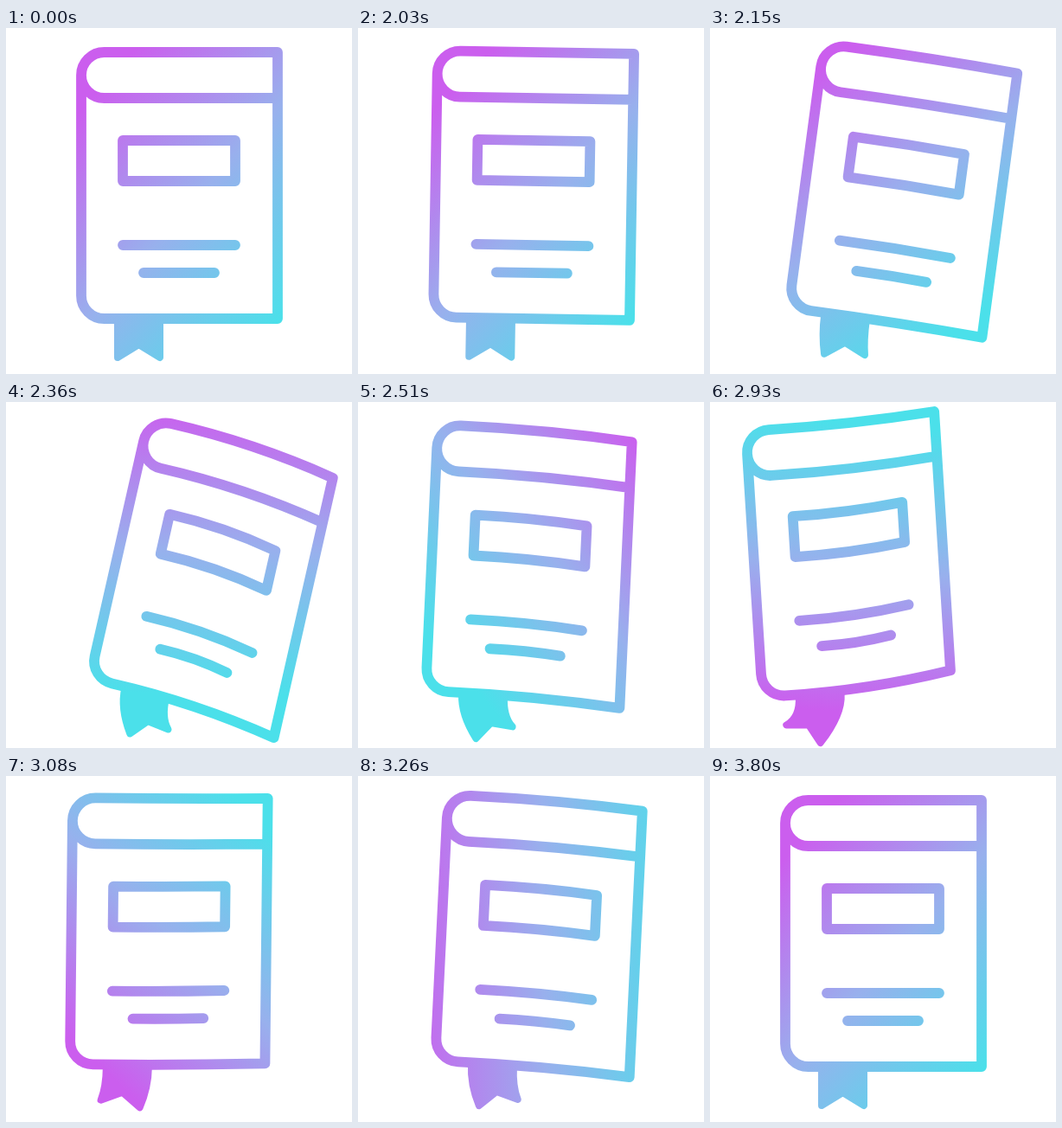
An HTML page with a canvas that plays this animation: 400x400 px, repeating every 3.83 s.

```html
<!DOCTYPE html>
<html>
<head>
<meta charset="utf-8">
<title>Swaying book</title>
<style>
html, body { margin: 0; width: 100%; height: 100%; overflow: hidden; background: #fff; }
canvas { display: block; width: 400px; height: 400px; }
</style>
</head>
<body>
<canvas id="stage" width="400" height="400"></canvas>
<script>
const ctx = document.getElementById('stage').getContext('2d');
const LOOP = 3830, START = 2030, STEP = 30, GRADIENT_HALF = 167;
const PIVOT = [200, 336];

// time, tilt (deg), shift x, shift y, cover bend, ribbon sway, gradient angle (deg), gradient centre x, y
const KEYS = [
  [2000, 0, 0, 0, 0, 0, 42, 200, 219],
  [2030, 0.95, 0, 0, 0, 0, 43, 200, 219],
  [2300, 13.6, 7, 7.5, 15, 13, 77, 200, 174],
  [2360, 12.8, 7, 8.6, 19.7, 14, 91, 200, 170],
  [2540, 0.5, -12, 2, 7, 15, 150, 242, 196],
  [2690, -8.6, -21.8, -1.7, -7.8, 14, 207, 280, 226],
  [2750, -9.2, -25, -1.9, -9, 8, 226, 262, 220],
  [2930, -3.6, -26.5, -2, -12.7, -22, 275, 200, 195],
  [3230, 2.9, 1.7, -1.3, 8, 8.5, 351, 213, 199],
  [3260, 2.8, 2, -1.3, 8, 9, 359, 215, 200],
  [3680, 0, 0, 0, 0, 0, 402, 200, 219]
];

const rad = deg => deg * Math.PI / 180;
const secant = (i, c) => (KEYS[i + 1][c] - KEYS[i][c]) / (KEYS[i + 1][0] - KEYS[i][0]);

// Monotone tangent: flat at extremes, harmonic mean elsewhere
function tangent(i, c) {
  if (i === 0 || i === KEYS.length - 1) return 0;
  const a = secant(i - 1, c), b = secant(i, c);
  return a * b <= 0 ? 0 : 2 * a * b / (a + b);
}

function poseAt(t) {
  const last = KEYS.length - 1;
  if (t < START) return KEYS[0].slice(1);
  if (t >= KEYS[last][0]) return KEYS[last].slice(1);
  const i = KEYS.findIndex(k => k[0] > t) - 1;
  const a = KEYS[i], b = KEYS[i + 1], span = b[0] - a[0], u = (t - a[0]) / span;
  const ease = u * u * (3 - 2 * u);
  return a.slice(1).map((v, j) => {
    const c = j + 1;
    return v + (b[c] - v) * ease
      + span * u * (1 - u) * ((1 - u) * tangent(i, c) - u * tangent(i + 1, c));
  });
}

// Moves a point of the cover; the spine side stays stiff
function warp(x, y, bend) {
  const u = Math.max(0, (x - 113) / 201);
  const w = u * u * (2.2 - 1.2 * u);
  const lift = bend < 0 ? 0.65 + 0.7 * y / 336 : 1;
  const shrink = bend < 0 ? -0.65 * bend : 0.22 * bend;
  return [x - shrink * u ** 4, y + bend * w * lift];
}

// Curved horizontal edge, flat at its left end
function edgeTo(x1, x2, y, bend) {
  const a = warp(x1, y, bend), b = warp(x2, y, bend);
  const left = x1 < x2 ? a : b;
  ctx.quadraticCurveTo((a[0] + b[0]) / 2, left[1], ...b);
}

function bar(x1, x2, y, bend) {
  ctx.moveTo(...warp(x1, y, bend));
  edgeTo(x1, x2, y, bend);
}

function coverPath(bend) {
  const r = 26.5, cx = 87 + r;
  ctx.beginPath();
  ctx.moveTo(314, 81);
  ctx.moveTo(...warp(314, 81, bend));
  edgeTo(314, cx, 81, bend);
  ctx.arc(cx, 54.5, r, Math.PI / 2, Math.PI * 1.5);
  edgeTo(cx, 314, 28, bend);
  ctx.lineTo(...warp(314, 336, bend));
  edgeTo(314, cx, 336, bend);
  ctx.arc(cx, 336 - r, r, Math.PI / 2, Math.PI);
  ctx.lineTo(87, 54.5);

  bar(135, 265, 130, bend);
  ctx.lineTo(...warp(265, 177, bend));
  edgeTo(265, 135, 177, bend);
  ctx.closePath();
  bar(135, 265, 251, bend);
  bar(159, 241, 283, bend);
}

function ribbonPath(sway) {
  const s = Math.abs(sway);
  const left = [129 + sway + s / 4, 381 + sway * 0.5];
  const right = [178 + sway - s / 4, 381 - sway * 0.55];
  ctx.beginPath();
  ctx.moveTo(129, 338);
  ctx.quadraticCurveTo(129, 362, ...left);
  ctx.lineTo(153.5 + sway * 0.7, 366 + s * 0.25);
  ctx.lineTo(...right);
  ctx.quadraticCurveTo(178, 362, 178, 338);
  ctx.closePath();
}

function place(tilt, x, y) {
  ctx.translate(PIVOT[0] + x, PIVOT[1] + y);
  ctx.rotate(rad(tilt));
  ctx.translate(-PIVOT[0], -PIVOT[1]);
}

function draw(t) {
  const [tilt, x, y, bend, sway, angle, gx, gy] = poseAt(t);
  const dx = Math.cos(rad(angle)) * GRADIENT_HALF, dy = Math.sin(rad(angle)) * GRADIENT_HALF;
  const paint = ctx.createLinearGradient(gx - dx, gy - dy, gx + dx, gy + dy);
  paint.addColorStop(0, '#cb5eee');
  paint.addColorStop(0.5, '#98b0ed');
  paint.addColorStop(1, '#4be0ea');

  ctx.resetTransform();
  ctx.clearRect(0, 0, 400, 400);
  ctx.fillStyle = ctx.strokeStyle = paint;
  ctx.lineCap = ctx.lineJoin = 'round';

  // Paths are built in book space, painted in stage space
  place(tilt, x, y);
  ribbonPath(sway);
  ctx.resetTransform();
  ctx.lineWidth = 8;
  ctx.fill();
  ctx.stroke();

  place(tilt, x, y);
  coverPath(bend);
  ctx.resetTransform();
  ctx.lineWidth = 11.8;
  ctx.stroke();
}

const begin = performance.now();
function frame() {
  const t = (performance.now() - begin) % LOOP;
  draw(t < START ? 0 : START + Math.floor((t - START) / STEP) * STEP);
  requestAnimationFrame(frame);
}
frame();
</script>
</body>
</html>
```
